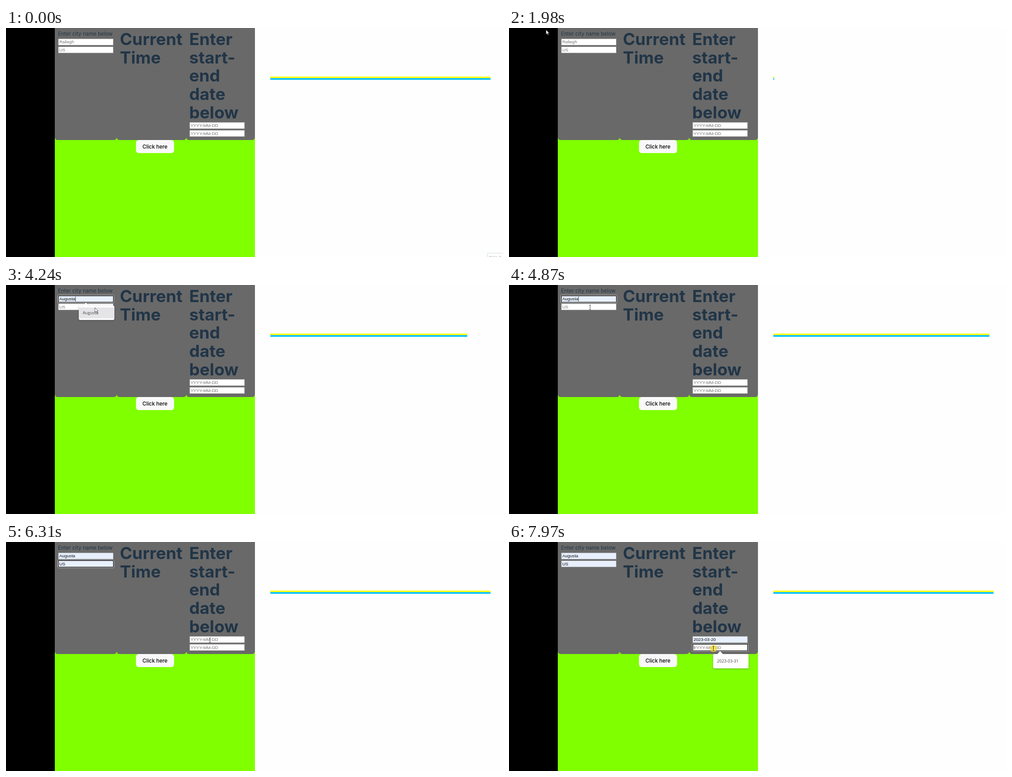
An HTML page for the animation above (8000 ms loop, 1100 px wide and 509 px high).

```html
<!DOCTYPE html>
<html lang="en">
<head>
<meta charset="utf-8">
<title>City dates form</title>
<style>
  html, body { margin: 0; width: 100%; height: 100%; overflow: hidden; background: #fefefe; }
  svg { display: block; width: 1100px; height: 509px; }
  .ui { font: 400 11.56px Inter, sans-serif; fill: #213547; }
  .title { font: 700 37px Inter, sans-serif; fill: #213547; }
  .button { font: 500 11.56px Inter, sans-serif; fill: #000; text-anchor: middle; }
  .input { font: 9.64px "Liberation Sans", Arial, sans-serif; }
  .option { font: 9.2px "Open Sans", sans-serif; fill: #444; }
  .popup { filter: drop-shadow(0 1px 1.5px rgba(0, 0, 0, .35)); }
</style>
</head>
<body>
<svg id="stage" viewBox="0 0 1100 509">
  <rect width="1100" height="509" fill="#fefefe"/>
  <rect width="108" height="509"/>
  <rect x="108" width="443" height="509" fill="#80ff00"/>
  <g fill="#696969">
    <rect x="108" y="-4" width="137" height="253" rx="6"/>
    <rect x="245" y="-4" width="154" height="253" rx="6"/>
    <rect x="399" y="-4" width="152" height="253" rx="6"/>
  </g>
  <text x="115" y="17" class="ui">Enter city name below</text>
  <rect x="287.7" y="249" width="84.3" height="29" rx="6" fill="#f9f9f9"/>
  <text x="329.7" y="267.7" class="button">Click here</text>
  <rect class="line" x="585" y="108" height="3.6" fill="#ffff00"/>
  <rect class="line" x="585" y="111.4" height="3.7" fill="#00bfff"/>
  <g id="tip">
    <rect x="1065.5" y="500.5" width="60" height="20" fill="#fefefe" stroke="#cfdfe2"/>
    <text x="1069" y="513" class="input" fill="#8a9a9c">Snip it</text>
  </g>
</svg>
<script>
const LOOP = 8000;
const RELOAD = 1980;
const stage = document.getElementById('stage');
const tip = document.getElementById('tip');
const lines = document.querySelectorAll('.line');

function add(parent, tag, attrs = {}, text = '') {
  const node = document.createElementNS('http://www.w3.org/2000/svg', tag);
  for (const key in attrs) node.setAttribute(key, attrs[key]);
  node.textContent = text;
  parent.append(node);
  return node;
}
const show = (node, on) => { node.style.display = on ? '' : 'none'; };
const easeInOut = p => p * p * (3 - 2 * p);
const easeOut = p => 1 - (1 - p) ** 2;

function heading(x, words) {
  words.split(' ').forEach((word, i) =>
    add(stage, 'text', { x, y: 38 + i * 40.7, class: 'title' }, word));
}
heading(252, 'Current Time');
heading(405.5, 'Enter start- end date below');

// A field is focused by one click and filled by a second one on its popup.
const W = 122.8, H = 15.4, ROW = 17.5;
const city = { x: 115.3, y: 23.4, aim: 61.5 };
const date = { x: 405.8, y: 209.1, aim: 45.5 };
const field = (group, row, hint, value, focus, pick) =>
  ({ x: group.x, y: group.y + row * ROW, aim: group.x + group.aim, hint, value, focus, pick });

const fields = [
  field(city, 0, 'Raliegh', 'Augusta', 3830, 4600),
  field(city, 1, 'US', 'US', 5010, 5610),
  field(date, 0, 'YYYY-MM-DD', '2023-03-20', 6370, 7480),
  field(date, 1, 'YYYY-MM-DD', '2023-03-31', 7890, 9000)
];
fields.forEach((f, i) => {
  f.open = f.focus + 70;
  f.hover = f.focus + (f.pick - f.focus) * .49;
  f.blur = fields[i + 1]?.focus ?? Infinity;
});

function outline(parent, f, grow, stroke, width) {
  return add(parent, 'rect', {
    x: f.x - grow, y: f.y - grow, width: W + 2 * grow, height: H + 2 * grow,
    rx: Math.max(0, 1 + grow), stroke, 'stroke-width': width
  });
}

function buildField(f) {
  f.box = outline(stage, f, -.5, '#808080', 1);
  f.ring = add(stage, 'g', { fill: 'none' });
  outline(f.ring, f, .6, '#fff', 1);
  outline(f.ring, f, -.4, '#101010', 1.4);
  f.label = add(stage, 'text', { x: f.x + 2.6, y: f.y + 10.9, class: 'input' });
  f.caret = add(stage, 'rect', { y: f.y + 2.4, width: .8, height: 10.5 });
}

function buildPopup(f) {
  const x = f.x + 45.9, y = f.y + 22.4, width = 78.5;
  f.popup = add(stage, 'g', { class: 'popup' });
  add(f.popup, 'path', { d: `M${x + 9} ${y + .5}l6.5-7 6.5 7z`, fill: '#fff' });
  add(f.popup, 'rect', { x, y, width, height: 32, rx: 3, fill: '#fff' });
  f.shade = add(f.popup, 'rect', { x, y: y + 4, width, height: 24.5, fill: '#e5e5e7' });
  add(f.popup, 'text', { x: x + 8.5, y: y + 19.2, class: 'option' }, f.value);
}
fields.forEach(buildField);
fields.forEach(buildPopup);

const halo = add(stage, 'circle', { r: 8, fill: '#f2dc32', opacity: .75 });
const arrow = add(stage, 'path', {
  d: 'M0 0V10.3L2.4 8.1 4 11.8 5.6 11.1 4 7.6H7.2Z', fill: '#fff', stroke: '#222', 'stroke-width': .7
});
const beam = add(stage, 'path', {
  d: 'M-1.7-5H1.7M0-5V5M-1.7 5H1.7', fill: 'none', stroke: '#333', 'stroke-width': .9
});

// The pointer roams the page, then visits every field and its option.
const stop = (at, x, y) => ({ at, x, y });
const stops = [
  stop(0, 1115, 520), stop(810, 288, 268), stop(1370, 82, 4), stop(RELOAD, 82, 4),
  stop(2780, 660, 287), stop(3340, 187, 78),
  ...fields.flatMap(f => [
    stop(f.focus - 60, f.aim, f.y + 9),
    stop(f.focus, f.aim, f.y + 9),
    stop(f.hover, f.aim + 20, f.y + 27),
    stop(f.pick, f.aim + 20, f.y + 27)
  ])
];

function pointerAt(t) {
  const i = stops.findIndex(s => s.at > t);
  const a = stops[i - 1], b = stops[i];
  const k = easeInOut((t - a.at) / (b.at - a.at));
  return [a.x + (b.x - a.x) * k, a.y + (b.y - a.y) * k];
}

function chartWidth(t) {
  const p = t < RELOAD ? 1 : Math.min(1, (t - RELOAD) / 3350);
  return Math.max(2, 487.5 * easeOut(p));
}

function drawField(f, t) {
  const focused = t >= f.focus && t < f.blur;
  const filled = t >= f.hover;
  const text = filled ? f.value : f.hint;
  if (f.label.textContent !== text) f.label.textContent = text;
  f.label.setAttribute('fill', filled ? '#111' : '#757575');
  f.box.setAttribute('fill', filled ? '#e8f0fe' : '#fff');
  show(f.ring, focused);
  const blinkStart = t >= f.pick ? f.pick : f.focus;
  show(f.caret, focused && (t - blinkStart) % 1060 < 530);
  f.caret.setAttribute('x', f.x + 2.8 + (filled ? f.label.getComputedTextLength() : 0));
  show(f.popup, t >= f.open && t < f.pick);
  show(f.shade, filled);
}

function draw(t) {
  lines.forEach(line => line.setAttribute('width', chartWidth(t)));
  show(tip, t < 70);
  fields.forEach(f => drawField(f, t));

  const [x, y] = pointerAt(t);
  const choosing = fields.some(f => t >= f.hover && t < f.pick);
  const overInput = !choosing && fields.some(f =>
    x > f.x && x < f.x + W && y > f.y && y < f.y + H);
  const clicking = fields.some(f => [f.focus, f.pick].some(c => t >= c - 40 && t < c + 140));
  for (const node of [halo, arrow, beam]) node.setAttribute('transform', `translate(${x} ${y})`);
  show(halo, clicking);
  show(arrow, !overInput);
  show(beam, overInput);
}

const start = performance.now();
function tick() {
  draw((performance.now() - start) % LOOP);
  requestAnimationFrame(tick);
}
tick();
</script>
</body>
</html>
```
